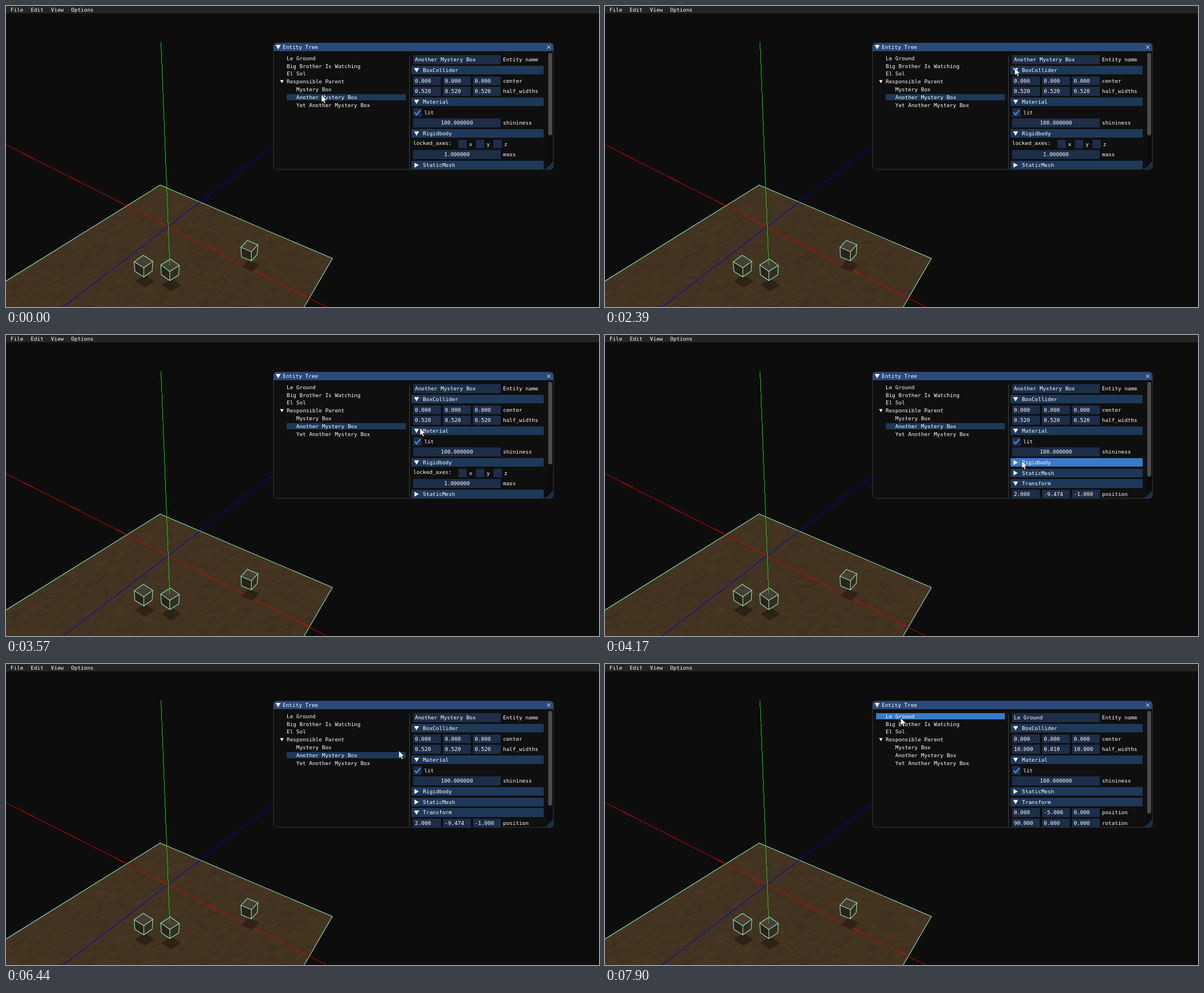
An HTML page with a canvas for the animation above (8 s loop, 1050x533 px).

```html
<!DOCTYPE html>
<html lang="en">
<head>
<meta charset="utf-8">
<title>Entity tree</title>
<style>
  html, body { margin: 0; width: 100%; height: 100%; overflow: hidden; background: #0d0d0d; }
  canvas, svg { position: absolute; left: 0; top: 0; width: 1050px; height: 533px; }
  text { font: 9.45px "DejaVu Sans Mono", monospace; fill: #fff; }
  rect { shape-rendering: crispEdges; }
  rect[rx] { shape-rendering: auto; }
  .wire { fill: none; stroke: #8ceaac; stroke-width: 1.1; stroke-linejoin: round; }
</style>
</head>
<body>
<canvas id="ground" width="1050" height="533"></canvas>
<svg viewBox="0 0 1050 533">
  <defs>
    <clipPath id="panel"><rect x="474" y="80" width="495" height="208.8"/></clipPath>
    <clipPath id="frame"><rect x="473.6" y="65.5" width="495.8" height="223.8" rx="5.7"/></clipPath>
  </defs>
  <g id="scene"></g>
  <g id="menu"></g>
  <g id="window"></g>
  <path id="cursor" d="M0 0V13.2L3 10.5L5 15.2L7.2 14.3L5.2 9.8L9.5 9.5Z" fill="#fff" stroke="#111" stroke-width=".7"/>
</svg>
<script>
const $ = id => document.getElementById(id);
const LOOP = 8000;
const LAG = 60;             // the interface answers the pointer one tick late
const HOVER_START = 2540;
const FRAME = '#1d2e48', LINE = '#3e3e47';
const accent = a => `rgba(66,150,250,${a})`;

// --- shape helpers -------------------------------------------------------
const rect = (x, y, w, h, fill, rx) =>
  `<rect x="${x}" y="${y}" width="${w}" height="${h}" fill="${fill}"${rx ? ` rx="${rx}"` : ''}/>`;
const label = (x, y, s, anchor = 'start') =>
  `<text x="${x}" y="${y + 3.3}" text-anchor="${anchor}">${s}</text>`;
const poly = (pts, attrs) => `<polygon points="${pts.join(' ')}" ${attrs}/>`;
const line = (a, b, color) => `<path d="M${a}L${b}" stroke="${color}" shape-rendering="crispEdges"/>`;
const arrow = (x, y, open, k = 1) =>
  `<path d="M-4.4 -3.7H4.4L0 3.9Z" fill="#fff" transform="translate(${x} ${y}) rotate(${open ? 0 : -90}) scale(${k})"/>`;

// --- 3D scene ------------------------------------------------------------
const FLOOR = [[0, 487], [273, 317], [578, 447], [528, 533]];

function paintGround() {
  const g = $('ground').getContext('2d');
  let seed = 7;
  const rnd = () => (seed = (seed * 16807) % 2147483647) / 2147483647;
  g.beginPath();
  [...FLOOR, [0, 533]].forEach(p => g.lineTo(...p));
  g.clip();
  g.fillStyle = '#433422';
  g.fillRect(0, 0, 1050, 533);
  for (let i = 0; i < 3000; i++) {
    const x = rnd() * 600 - 10, y = 310 + rnd() * 230, len = 5 + rnd() * 14;
    g.strokeStyle = rnd() < .5 ? 'rgba(34,25,15,.09)' : 'rgba(98,78,50,.09)';
    g.lineWidth = 1 + rnd() * 2;
    g.beginPath();
    g.moveTo(x, y);
    g.lineTo(x + len, y - len * .32);
    g.stroke();
  }
}

// A turned square seen from above; corners run right, front, left, back.
const square = (x, y, r, turn) => [0, 1, 2, 3].map(k => {
  const a = turn + k * Math.PI / 2;
  return [x + r * Math.cos(a), y + r * .67 * Math.sin(a)];
});

function cube(x, y, r, turn, id) {
  const [R, F, L, B] = square(x, y, r, turn);
  const [r2, f2, l2] = square(x, y + 17, r * .93, turn);
  return poly(square(x + 2, y + 35, r * 1.05, turn), 'fill="#1c150e" opacity=".55"') +
    `<g id="${id}">` + poly([L, B, R, F], 'fill="#493d36"') +
    poly([L, F, f2, l2], 'fill="#2a221b"') + poly([F, R, r2, f2], 'fill="#352b23"') + '</g>' +
    `<path class="wire" d="M${L}L${B}L${R}L${F}ZL${l2}L${f2}L${r2}L${R}M${F}L${f2}"/>`;
}

$('scene').innerHTML =
  `<polyline class="wire" points="${FLOOR.join(' ')}"/>` +
  line([0, 245.5], [568, 533], '#d80000') +
  line([101.3, 533], [474, 247.5], '#0000c4') +
  cube(243.5, 452.5, 16.5, -.03, 'box') +
  cube(290.5, 459, 16.5, .03, 'box2') +
  cube(431, 425, 15.4, -.23, 'box3') +
  line([274.5, 64], [290, 459], '#00d800');

// Menu entries are spaced by their text width plus a fixed gap.
let menuX = 8;
$('menu').innerHTML = rect(0, 0, 1050, 13, '#242424') +
  ['File', 'Edit', 'View', 'Options'].map(s => {
    const item = label(menuX, 6.5, s);
    menuX += s.length * 5.69 + 13;
    return item;
  }).join('');

// --- pointer and clicks --------------------------------------------------
const treeY = i => 92.5 + i * 13.8;
const rowY = i => 95 + i * 18.68;

// Cursor moves: start, end, x, y.
const MOVES = [
  [0, 0, 558.5, 157.5],
  [250, 500, 517, 138],
  [500, 1000, 682, 177],
  [1090, 1330, 772, 166.5],
  [1890, 2390, 725.5, 109.5],
  [2390, 2540, 728.5, 111],
  [3270, 3900, 738, 223],
  [4230, 4440, 726.5, 188.5],
  [6040, 6160, 697, 154],
  [6440, 6570, 530, 120.5],
  [6980, 7120, 522.5, 108.5],
  [7200, 7820, 523.5, 95.5]
];

function cursorAt(t) {
  let x = 0, y = 0;
  for (const [from, to, tx, ty] of MOVES) {
    if (t < from) break;
    const u = t < to ? (t - from) / (to - from) : 1;
    x += (tx - x) * u;
    y += (ty - y) * u;
  }
  return [x, y];
}

// What is clicked, button down, button up. Every click flips its part.
const CLICKS = [
  ['collider', 2690, 2750], ['collider', 3030, 3120], ['body', 4050, 4110],
  ['lit', 5020, 5100], ['lit', 5780, 6040], ['ground', 7770, 7830]
];
const flipped = (part, t) => CLICKS.filter(([p, , up]) => p === part && t >= up).length % 2 === 1;

const stateAt = t => ({
  collider: !flipped('collider', t),
  body: !flipped('body', t),
  lit: !flipped('lit', t),
  ground: flipped('ground', t)
});

const pointer = { x: 0, y: 0, down: false, on: false };
function movePointer(t) {
  [pointer.x, pointer.y] = cursorAt(t - LAG);
  pointer.down = CLICKS.some(([, down, up]) => t >= down && t < up);
  pointer.on = t >= HOVER_START;
}
function glow(x, y, w, h, idle, hover = .8, active = 1) {
  const p = pointer;
  const over = p.on && p.x >= x && p.x < x + w && p.y >= y && p.y < y + h;
  return over ? (p.down ? active : hover) : idle;
}

// --- property rows, each drawn at its centre line ------------------------
const field = (x, y, w) => rect(x, y - 7.7, w, 15.4, FRAME);
const header = (s, open) => y =>
  rect(718, y - 7.7, 233.5, 15.4, accent(glow(718, y - 7.7, 233.5, 15.4, .31))) +
  arrow(727, y, open) + label(738.3, y, s);
const nameRow = s => y => field(720.6, y, 155.6) + label(724, y, s) + label(880, y, 'Entity name');
const number = (v, s) => y => field(720.6, y, 155.6) + label(798.5, y, v, 'middle') + label(880, y, s);
const vector = (vals, s) => y => vals.map((v, i) =>
  field(720.6 + i * 53, y, 49.6) + label(724 + i * 53, y, v.toFixed(3))).join('') + label(880, y, s);
const check = on => y => {
  const a = glow(720.6, y - 7.7, 15.4, 15.4, 0, .4, .67);
  return rect(720.6, y - 7.7, 15.4, 15.4, a ? accent(a) : FRAME) +
    (on ? `<path d="M723.7 ${y + .3}l3.4 3.7l6.6 -8" fill="none" stroke="#4296fa" stroke-width="2"/>` : '') +
    label(740.5, y, 'lit');
};
const axesRow = y => label(721, y - 2.2, 'locked_axes:') +
  ['x', 'y', 'z'].map((s, i) => field(801 + i * 31, y, 15.4) + label(820 + i * 31, y, s)).join('');

function rowsFor(s) {
  const collider = [
    vector([0, 0, 0], 'center'),
    vector(s.ground ? [10, .01, 10] : [.52, .52, .52], 'half_widths')
  ];
  const body = [axesRow, number('1.000000', 'mass')];
  return [
    nameRow(s.ground ? 'Le Ground' : 'Another Mystery Box'),
    header('BoxCollider', s.collider), ...(s.collider ? collider : []),
    header('Material', true), check(s.lit), number('100.000000', 'shininess'),
    ...(s.ground ? [] : [header('Rigidbody', s.body)]),
    ...(!s.ground && s.body ? body : []),
    header('StaticMesh', false), header('Transform', true),
    vector(s.ground ? [0, -5, 0] : [2, -9.474, -1], 'position'),
    vector([s.ground ? 90 : 0, 0, 0], 'rotation'),
    vector([1, 1, 1], 'scale')
  ];
}

const TREE = ['Le Ground', 'Big Brother Is Watching', 'El Sol', 'Responsible Parent',
  'Mystery Box', 'Another Mystery Box', 'Yet Another Mystery Box'];

const tree = selected => TREE.map((name, i) => {
  const y = treeY(i), child = i > 3, x = child ? 497 : 480, w = 707.5 - x;
  const a = glow(x, y - 5.5, w, 11, i === selected ? .31 : 0);
  return (a ? rect(x, y - 5.5, w, 11, accent(a)) : '') +
    (i === 3 ? arrow(488.5, y, true, .7) : '') + label(child ? 514 : 497, y, name);
}).join('');

function windowMarkup(t) {
  const s = stateAt(t);
  const thumb = 2219 / (rowsFor(stateAt(t - LAG)).length + .2);
  const rows = rowsFor(s).slice(0, 11).map((row, i) => row(rowY(i))).join('');
  return '<g clip-path="url(#frame)">' +
    rect(473, 65, 497, 225, '#0f0f0f') + rect(473, 65, 497, 15.4, '#294a7a') +
    rect(958.5, 80.4, 10, 209, '#0b0b0b') +
    poly([[969.5, 274.5], [969.5, 289.5], [954.5, 289.5]], `fill="${accent(.25)}"`) + '</g>' +
    `<rect x="473.8" y="65.7" width="495.4" height="223.5" rx="5.7" fill="none" stroke="${LINE}" stroke-width=".9"/>` +
    arrow(482, 72.8, true) + label(490, 73, 'Entity Tree') +
    '<path d="M958 69.8l6 6m0 -6l-6 6" stroke="#fff"/>' +
    rect(714, 88, 1, 200, LINE) + rect(960, 83, 7, thumb, '#4c4c4c', 3.5) +
    `<g clip-path="url(#panel)">${tree(s.ground ? 0 : 5)}${rows}</g>`;
}

// --- playback ------------------------------------------------------------
const boxFaces = [...$('box').children].map(el => [el, el.getAttribute('fill')]);
const start = performance.now();
let shown = '';

function draw() {
  const t = (performance.now() - start) % LOOP;
  movePointer(t);
  const markup = windowMarkup(t);
  if (markup !== shown) {
    $('window').innerHTML = shown = markup;
    const { lit } = stateAt(t);
    boxFaces.forEach(([el, fill]) => el.setAttribute('fill', lit ? fill : '#000'));
  }
  $('cursor').setAttribute('transform', `translate(${cursorAt(t)})`);
  requestAnimationFrame(draw);
}

paintGround();
draw();
</script>
</body>
</html>
```
